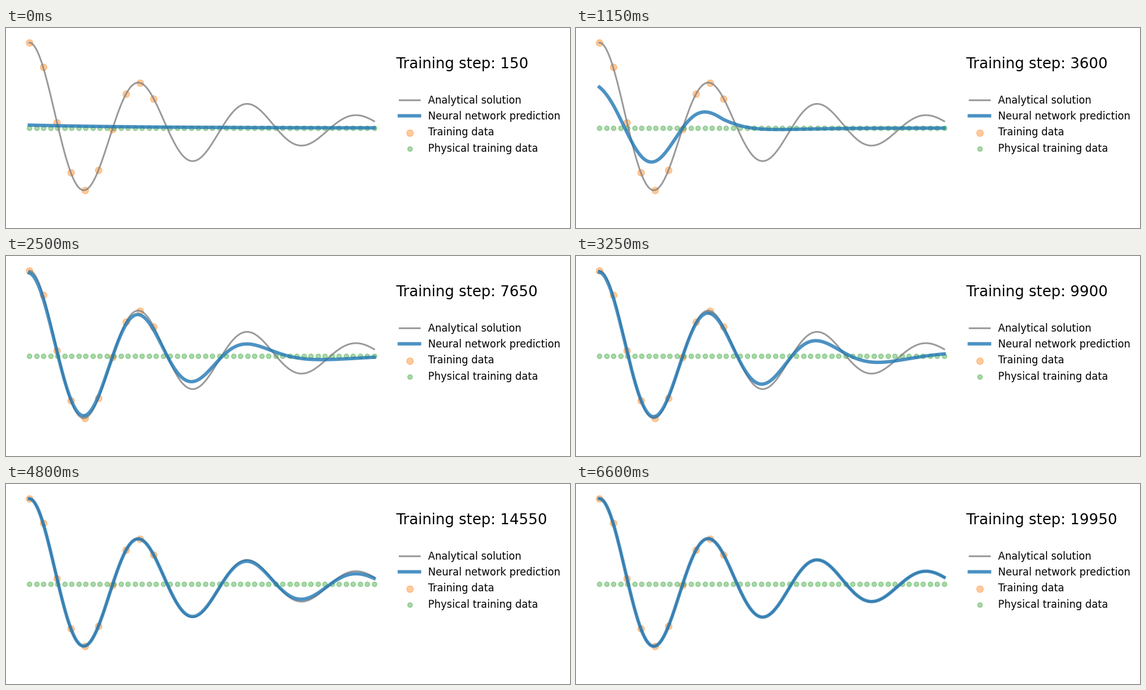
A matplotlib script that plays this animation: 922x328 px, repeating every 6650 ms.

```python
import numpy as np
import matplotlib.pyplot as plt
from matplotlib.animation import FuncAnimation

FRAMES = 133
STEP = 150
DAMP, OMEGA0 = 2, 20
W = np.sqrt(OMEGA0**2 - DAMP**2)
PHI = np.arctan(-DAMP / W)
DATA_END = 0.36
t = np.linspace(0, 1, 500)

# Progress of the training: (frame, skill)
SKILL = [(14, -1.5), (23, 0.45), (28, 1.87), (37, 2.8), (43, 3.2),
         (65, 3.93), (83, 5), (111, 7.5), (132, 10)]


def envelope(t):
    return np.exp(-DAMP * t) / np.cos(PHI)


def oscillator(t):
    return envelope(t) * np.cos(PHI + W * t)


def smoothstep(x):
    x = np.clip(x, 0, 1)
    return x * x * (3 - 2 * x)


def warmup(n):
    """First guess: a plain decay that grows and steepens."""
    return 0.034 * np.exp(n / 8.4 - (3 + 0.43 * n) * t)


def trained(n):
    """Damped wave that is learned from left to right."""
    skill = np.interp(n, *zip(*SKILL))
    gain = 1 / (1 + np.exp(2.4 * (1 - np.cos(np.pi * t)) - skill))
    # The phase runs slow where no data guides it, and starts early at first.
    slow = np.where(t > DATA_END, 1.1 * (1 - gain)**3, 0)
    lag = np.cumsum(slow) * t[1]
    lead = 0.1 * (1 - gain[0]) * np.exp(-t / 0.055)
    return gain * envelope(t) * np.cos(PHI + W * (t - lag + lead))


def prediction(n):
    mix = smoothstep((n - 14) / 9)
    return (1 - mix) * warmup(min(n, 23)) + mix * trained(n)


fig = plt.figure(figsize=(9.22, 3.28), dpi=100, facecolor="white")
ax = fig.add_axes([10 / 922, 10 / 328, 620 / 922, 308 / 328])
ax.set(xlim=(-0.05, 1.05), ylim=(-1.1, 1.1))
ax.axis("off")

samples = t[0:200:20]
physics = np.linspace(0, 1, 50)
ax.plot(t, oscillator(t), color="grey", lw=2, alpha=0.8,
        label="Analytical solution")
line, = ax.plot(t, prediction(0), color="tab:blue", lw=4, alpha=0.8,
                label="Neural network prediction")
ax.scatter(samples, oscillator(samples), s=60, color="tab:orange", alpha=0.4,
           label="Training data")
ax.scatter(physics, 0 * physics, s=30, color="tab:green", alpha=0.4,
           label="Physical training data")
ax.legend(loc=(1.01, 0.34), frameon=False, fontsize="large")
title = ax.text(1.065, 0.7, "", fontsize="xx-large", color="k")


def update(n):
    line.set_ydata(prediction(n))
    title.set_text(f"Training step: {STEP * (n + 1)}")
    return line, title


anim = FuncAnimation(fig, update, frames=FRAMES, interval=50, repeat=True,
                     repeat_delay=0)
plt.show()
```
